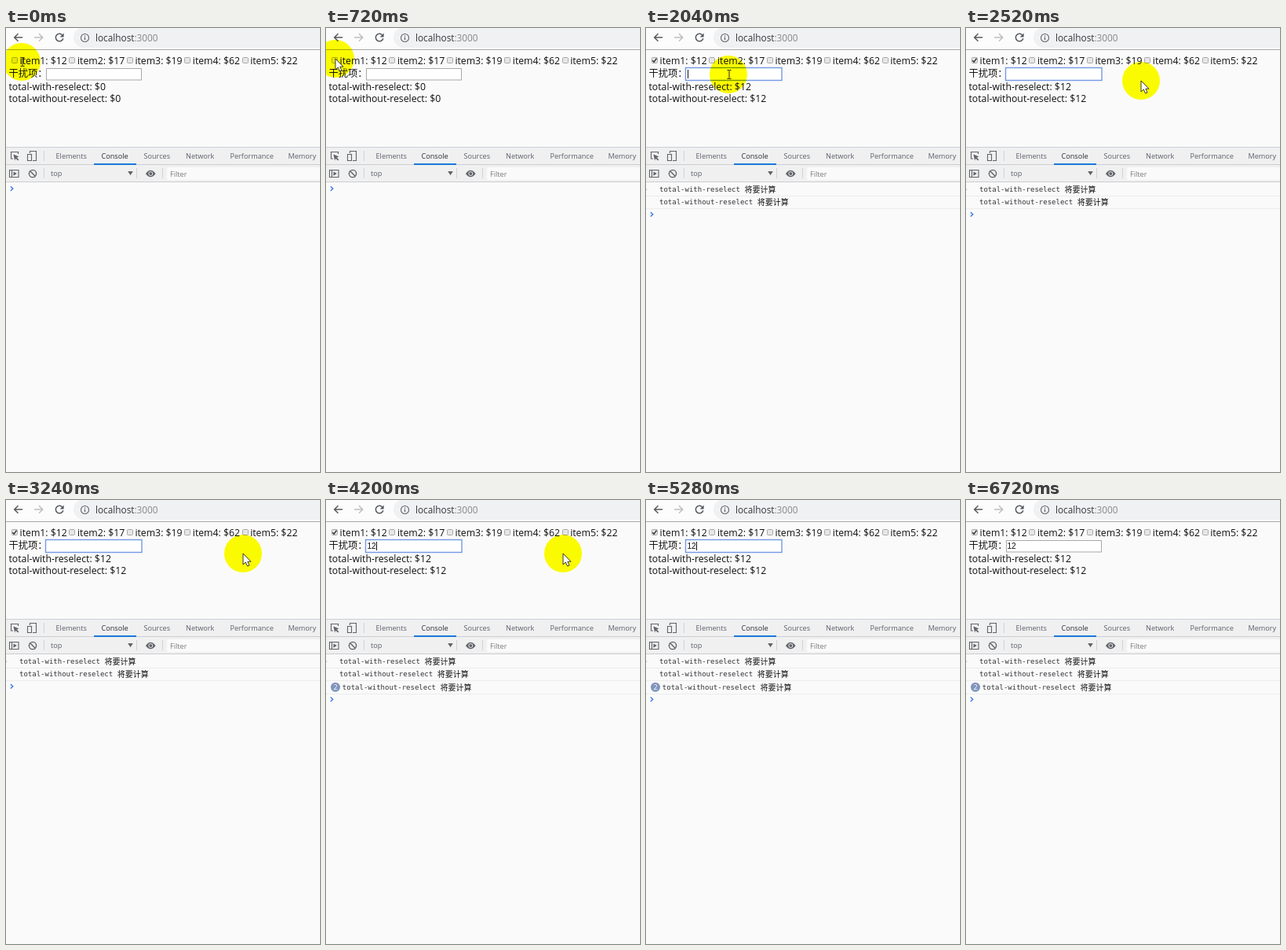
Animation of 400 by 564 pixels, one loop 7.8 s. Source, as an HTML page:

```html
<!DOCTYPE html>
<html lang="en">
<head>
<meta charset="utf-8">
<title>Reselect demo</title>
<style>
  html, body { margin: 0; width: 100%; height: 100%; overflow: hidden; background: #fafafa; }
  svg { display: block; isolation: isolate; }
  text { white-space: pre; }
  .page { font: 12.28px "Open Sans", "Noto Sans CJK SC", sans-serif; fill: #111; }
  .url { font: 11.8px "Open Sans", sans-serif; fill: #34373b; }
  .ui { font: 9.15px "Open Sans", sans-serif; fill: #5a5f66; }
  .log { font: 9px "DejaVu Sans Mono", monospace; fill: #303236; }
  .cjk { font: 10px "Noto Sans CJK SC", sans-serif; fill: #111; }
  .field { font: 10.1px "Liberation Sans", sans-serif; fill: #111; }
  .icon { fill: none; stroke: #5f6368; stroke-width: 1.1; }
  .nav { fill: none; stroke: #55585c; stroke-width: 1.5; }
  .box { fill: #e6e6e6; stroke: #a9a9a9; }
</style>
</head>
<body>
<svg width="400" height="564" viewBox="0 0 400 564">
  <rect width="400" height="564" fill="#fafafa"/>

  <!-- browser toolbar -->
  <rect width="400" height="27" fill="#fcfcfc"/>
  <rect x="86" y="-1" width="340" height="26" rx="13" fill="#f0f1f2"/>
  <rect y="27" width="400" height="1" fill="#a8a8a8"/>
  <path class="nav" d="M21 12H11M15.5 7.2L10.7 12l4.8 4.8"/>
  <path class="nav" d="M36 12H46.5M42 7.2L46.8 12l-4.8 4.8" style="stroke:#bdbfc1"/>
  <path class="nav" d="M71.6 8.7A4.8 4.8 0 1 0 72.8 13.2"/>
  <path d="M73.6 6.4v5h-5z" fill="#55585c"/>
  <circle class="icon" cx="100.5" cy="12.5" r="5"/>
  <path class="icon" d="M100.5 11.8v3.5M100.5 9.4v1.3" style="stroke-width:1.3"/>
  <text class="url" x="114" y="16.5">localhost<tspan fill="#85898d">:3000</tspan></text>

  <!-- web page -->
  <g id="items"></g>
  <path id="check" d="M8.3 41.2l1.9 2 3.3-4.6" fill="none" stroke="#333" stroke-width="1.5"/>
  <text class="page" x="3.5" y="62">干扰项：</text>
  <rect id="input" fill="#fff"/>
  <text id="typed" class="field" x="52.5" y="62"></text>
  <rect id="caret" y="53" width="1" height="11" fill="#111"/>
  <text id="memoTotal" class="page" x="3.5" y="79"></text>
  <text id="plainTotal" class="page" x="3.5" y="94.4"></text>

  <!-- developer tools -->
  <rect y="151" width="400" height="45" fill="#f0f0f1"/>
  <path d="M0 151.5H400M0 173.5H400M0 195.5H400" stroke="#c9ced2"/>
  <path d="M48.5 156v13M48.5 178v13M166.5 178v13M199.5 178v13" stroke="#cfd1d3"/>
  <rect x="112" y="172" width="54" height="2" fill="#1a78d6"/>
  <rect x="205" y="177" width="200" height="16" fill="#fafafa"/>
  <g id="tabs"></g>
  <path class="icon" d="M9 166H6.5V157.5H15.5V160"/>
  <path d="M9.5 160.5l7 3-2.8 1 2.6 2.8-1.2 1.2-2.7-2.8-1.2 2.6z" fill="#5f6368"/>
  <path class="icon" d="M30.5 159V156.5H38.5V168.5H34M27.5 160.5h5v8h-5z"/>
  <path class="icon" d="M4.5 180.5h11.5v9H4.5zM7.5 180.5v9"/>
  <path d="M9.5 182.3v5.4l4.2-2.7z" fill="#5f6368"/>
  <circle class="icon" cx="34" cy="185" r="4.6" style="stroke-width:1.4"/>
  <path class="icon" d="M30.8 181.8l6.4 6.4" style="stroke-width:1.4"/>
  <text class="ui" x="57" y="188.3">top</text>
  <path d="M155.2 182h6.6l-3.3 5z" fill="#5f6368"/>
  <path d="M178 185q6-8.6 12.6 0q-6.6 8.6-12.6 0z" fill="#5f6368"/>
  <circle cx="184.3" cy="185" r="2.5" fill="#5f6368" stroke="#f0f0f1"/>
  <text class="ui" x="209" y="189.2" style="fill:#777b80">Filter</text>
  <g id="logs"></g>
  <path id="prompt" d="M5.8 -2.7L8.8 0l-3 2.7" fill="none" stroke="#3a7be0" stroke-width="1.4"/>

  <!-- highlighted pointer -->
  <circle id="halo" r="24" fill="#ff0" style="mix-blend-mode:multiply"/>
  <path id="arrow" d="M0 0V14L3.3 11 5.6 16 8 15 5.8 10.2H10Z" fill="#fff" stroke="#222" stroke-width=".9"/>
  <path id="beam" d="M-1.5 -5.5h2l.5.5.5-.5h2M1 -5V5M-1.5 5.5h2l.5-.5.5.5h2" fill="none" stroke="#222"/>
</svg>
<script>
const LOOP = 7800, STEP = 120;
const CHECKED = 1080, FOCUS = 2040, TYPE_1 = 3600, TYPE_2 = 3960, BLUR = 6480;
const caretOn = [[2040, 2520], [2880, 3240], [3600, 4440], [4920, 5400], [5880, BLUR]];

// time, x, y
const pointerPath = [
  [0, 20, 43], [240, 18, 43], [480, 16, 42], [720, 12, 39], [1320, 12, 39],
  [1440, 16, 43], [1560, 25, 48], [1800, 75, 57], [2160, 120, 60],
  [2280, 140, 62], [2400, 190, 65], [2520, 223, 67], [2880, 302, 68],
  [4800, 302, 68], [4920, 302, 110], [5040, 312, 215], [5160, 385, 420], [5280, 440, 640]
];

const $ = id => document.getElementById(id);
const set = (id, attrs) => Object.entries(attrs).forEach(([k, v]) => $(id).setAttribute(k, v));
const show = (id, visible) => $(id).style.display = visible ? "" : "none";

$("items").innerHTML = [12, 17, 19, 62, 22].map((price, i) => {
  const x = i * 73.4;
  return `<rect class="box" x="${Math.round(x) + 7.5}" y="37.5" width="7" height="7" rx="1"/>
    <text class="page" x="${x + 17.6}" y="46">item${i + 1}: $${price}</text>`;
}).join("");

$("tabs").innerHTML = Object.entries({
  Elements: 63.5, Console: 121.5, Sources: 175.5, Network: 229, Performance: 285.5, Memory: 359.5
}).map(([name, x]) =>
  `<text class="ui" x="${x}" y="166.3"${name === "Console" ? ' style="fill:#2c2f33"' : ""}>${name}</text>`
).join("");

function logRow(row, name, count) {
  const y = 205 + row * 16.4, x = count > 1 ? 20.8 : 17;
  const badge = count > 1
    ? `<circle cx="12" cy="${y}" r="6" fill="#7f94bd"/>
       <text class="ui" x="12" y="${y + 3.2}" text-anchor="middle" style="fill:#fff">${count}</text>` : "";
  const mark = row ? "" : `<rect y="${y - 1}" width="1" height="2" fill="#c4c4c4"/>`;
  return `${badge}${mark}<text class="log" x="${x}" y="${y + 3}">${name}</text>
    <text class="cjk" x="${x + (name.length + 1) * 5.42}" y="${y + 3.8}">将要计算</text>
    <rect y="${Math.round(y + 8)}" width="400" height="1" fill="#ececec"/>`;
}

function pointerAt(t) {
  const i = pointerPath.findIndex(p => p[0] > t);
  if (i < 0) return pointerPath.at(-1).slice(1);
  const [t0, x0, y0] = pointerPath[i - 1], [t1, x1, y1] = pointerPath[i];
  const k = (t - t0) / (t1 - t0);
  return [x0 + (x1 - x0) * k, y0 + (y1 - y0) * k];
}

function draw(t) {
  const checked = t >= CHECKED, focused = t >= FOCUS && t < BLUR;
  const typed = t >= TYPE_2 ? "12" : t >= TYPE_1 ? "1" : "";
  const total = checked ? 12 : 0;

  show("check", checked);
  $("memoTotal").textContent = `total-with-reselect: $${total}`;
  $("plainTotal").textContent = `total-without-reselect: $${total}`;
  $("typed").textContent = typed;
  set("input", focused
    ? { x: 50.5, y: 50.5, width: 122.5, height: 16, stroke: "#7399e4", "stroke-width": 1.4 }
    : { x: 51.5, y: 51.5, width: 121, height: 14.5, stroke: "#a9a9a9", "stroke-width": 1 });
  show("caret", caretOn.some(([from, to]) => t >= from && t < to));
  set("caret", { x: 53 + Math.round(typed.length * 5.6) });

  const rows = [];
  if (checked) rows.push(["total-with-reselect", 1], ["total-without-reselect", 1]);
  if (typed) rows.push(["total-without-reselect", typed.length]);
  $("logs").innerHTML = rows.map(([name, count], i) => logRow(i, name, count)).join("");
  set("prompt", { transform: `translate(0 ${204 + rows.length * 16.4})` });

  const [x, y] = pointerAt(t), overText = x >= 16 && x < 173;
  set("halo", { cx: x, cy: y });
  for (const id of ["arrow", "beam"]) set(id, { transform: `translate(${x} ${y})` });
  show("arrow", !overText);
  show("beam", overText);
}

let lastStep = -1;
function tick() {
  const t = Math.floor(performance.now() % LOOP / STEP) * STEP;
  if (t !== lastStep) draw(lastStep = t);
  requestAnimationFrame(tick);
}
tick();
</script>
</body>
</html>
```
